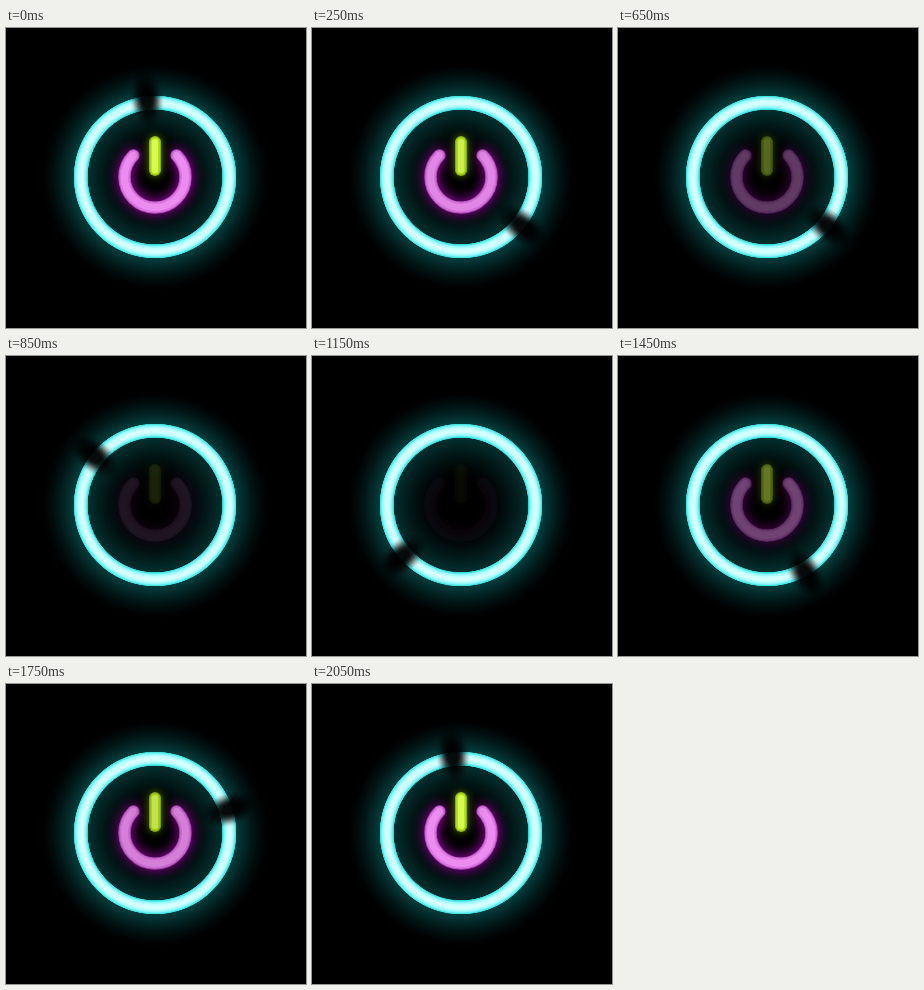
Recreate the animation shown at these times as an HTML page with a canvas. Size 300 px wide and 300 px high, loop 2.1 s.

```html
<!DOCTYPE html>
<html lang="en">
<head>
<meta charset="utf-8">
<title>Neon power button</title>
<style>
html, body { margin: 0; width: 100%; height: 100%; overflow: hidden; background: #000; }
canvas { display: block; width: 300px; height: 300px; }
</style>
</head>
<body>
<canvas id="stage" width="300" height="300"></canvas>
<script>
const SIZE = 300, CENTER = 149;
const LOOP = 2100, HOLD = 150, STEP = 50;
const LAST = 39, BREAK = 16;
const RING = 74.3, HALF = 6.9, REACH = 114;

const ctx = document.getElementById('stage').getContext('2d');
const clamp = (x, lo, hi) => Math.min(hi, Math.max(lo, x));

// Two turns at 8 steps each, then three slightly faster ones
function gapAngle(step) {
  const turns = step < BREAK ? step / 8 : 2 + 3 * (step - BREAK) / (LAST - BREAK);
  return turns * 2 * Math.PI - 6 * Math.PI / 180;
}

// Fade out, short dark pause, fade in
function glyphPower(step) {
  const out = 1 - (step - 2.4) / 14.5;
  const back = (step - 20.5) / 13.8;
  return clamp(Math.max(out, back), 0.03, 1);
}

function ringColor(r) {
  const d = Math.abs(r - RING);
  if (d <= HALF) {
    const u = d / HALF;
    return `rgb(${215 - 175 * u ** 2},${255 - 40 * u ** 4},${255 - 40 * u ** 4})`;
  }
  const [level, extent] = r > RING ? [62, 33] : [48, 42];
  const glow = level * Math.max(0, 1 - (d - HALF) / extent) ** 1.5;
  return `rgb(${glow * 0.08},${glow},${glow})`;
}

function layer(paint) {
  const canvas = document.createElement('canvas');
  canvas.width = canvas.height = SIZE;
  const g = canvas.getContext('2d');
  g.translate(CENTER, CENTER);
  paint(g);
  return canvas;
}

const ring = layer(g => {
  const fill = g.createRadialGradient(0, 0, 0, 0, 0, REACH);
  for (let r = 0; r <= REACH; r += 0.5) fill.addColorStop(r / REACH, ringColor(r));
  g.fillStyle = fill;
  g.arc(0, 0, REACH, 0, 2 * Math.PI);
  g.fill();
});

function stroke(g, path, width, color, glow, blur) {
  g.lineWidth = width;
  g.strokeStyle = color;
  g.shadowColor = glow || 'transparent';
  g.shadowBlur = blur || 0;
  g.stroke(path);
}

const glyph = layer(g => {
  const arc = new Path2D();
  arc.arc(0, 0, 30.5, -Math.PI / 4, Math.PI * 5 / 4);
  const bar = new Path2D('M0 -35V-7');
  g.lineCap = 'round';
  stroke(g, arc, 12.5, '#b04cba', '#a800b4', 13);
  stroke(g, arc, 10.5, '#dc76e2');
  stroke(g, arc, 7, '#ec8cf0');
  stroke(g, bar, 14, '#000', '#000', 14);
  stroke(g, bar, 12, '#8ab400', '#5c8200', 8);
  stroke(g, bar, 9.5, '#b8e424');
  stroke(g, bar, 6, '#d6fa50');
});

const gapFill = ctx.createRadialGradient(0, 0, 0, 0, 0, 1);
for (let u = 0; u <= 1; u += 0.125) {
  const fade = clamp((u - 0.25) / 0.75, 0, 1);
  gapFill.addColorStop(u, `rgba(0,0,0,${0.96 * (1 + Math.cos(Math.PI * fade)) / 2})`);
}

function drawGap(angle) {
  ctx.save();
  ctx.translate(CENTER, CENTER);
  ctx.rotate(angle);
  ctx.translate(0, -79);
  ctx.scale(18, 34);
  ctx.fillStyle = gapFill;
  ctx.fillRect(-1, -1, 2, 2);
  ctx.restore();
}

function draw(step) {
  ctx.globalAlpha = 1;
  ctx.fillStyle = '#000';
  ctx.fillRect(0, 0, SIZE, SIZE);
  ctx.drawImage(ring, 0, 0);
  ctx.globalAlpha = glyphPower(step);
  ctx.drawImage(glyph, 0, 0);
  ctx.globalAlpha = 1;
  drawGap(gapAngle(step));
}

function tick() {
  const t = performance.now() % LOOP;
  draw(t < HOLD ? 0 : 1 + Math.floor((t - HOLD) / STEP));
  requestAnimationFrame(tick);
}
tick();
</script>
</body>
</html>
```
